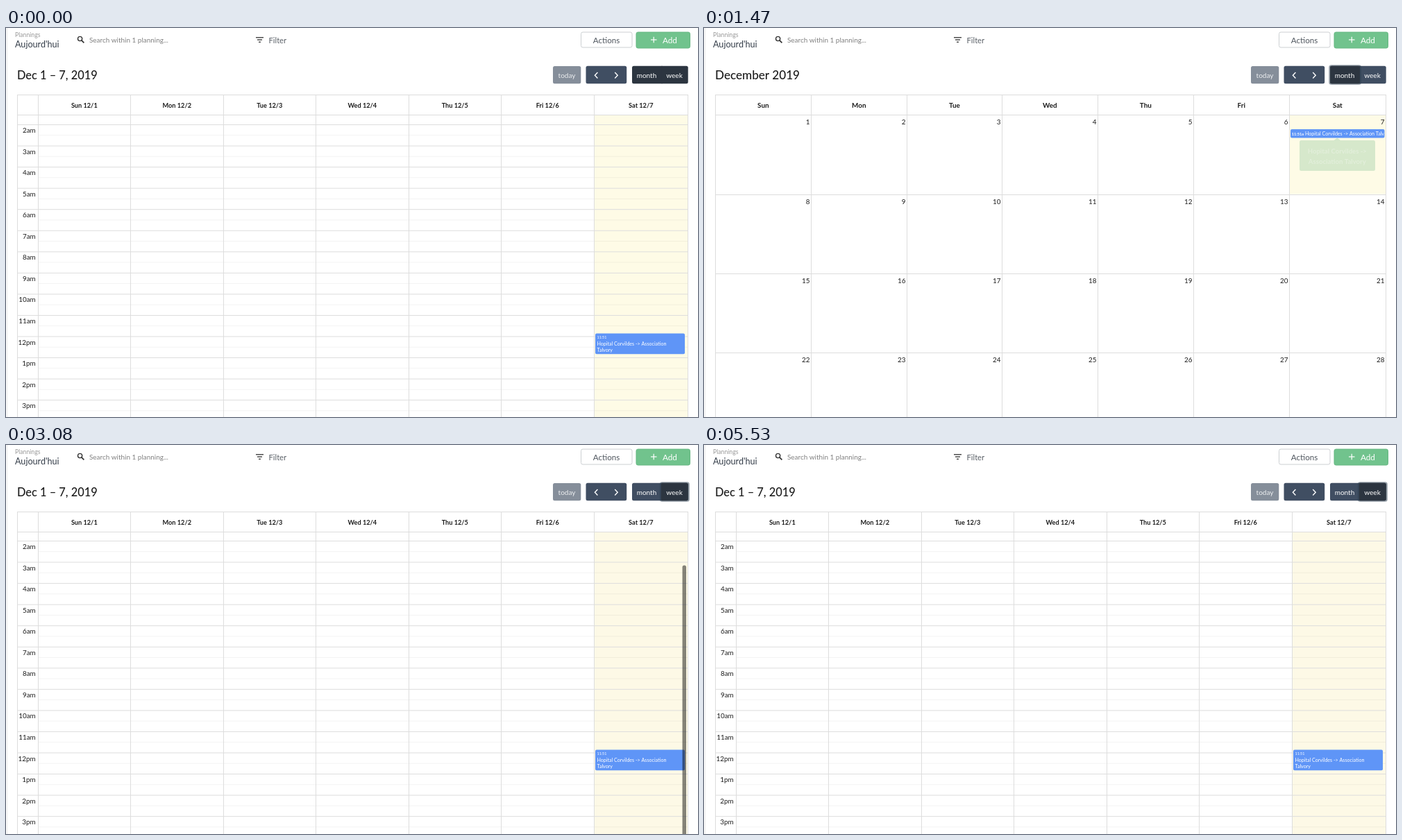
Recreate the animation shown at these times as an HTML page with a canvas. Size 997 by 561 pixels, loop 5810 ms.

```html
<!DOCTYPE html>
<html lang="en">
<head>
<meta charset="utf-8">
<title>Planning calendar</title>
<style>
  html, body { margin: 0; width: 100%; height: 100%; overflow: hidden; background: #fff; }
  canvas { display: block; width: 997px; height: 561px; }
</style>
</head>
<body>
<canvas id="stage" width="997" height="561"></canvas>
<script>
const ctx = document.getElementById('stage').getContext('2d');
const W = 997, H = 561, LOOP = 5810, STEP = 70;
const DAYS = ['Sun', 'Mon', 'Tue', 'Wed', 'Thu', 'Fri', 'Sat'];
const WEEK_X = [46, 179, 313, 446, 580, 713, 847, 982];
const MONTH_X = [16, 154, 292, 429, 567, 705, 843, 982];
const ROWS = [125, 240, 354, 468];
const PLACE = 'Hopital Corvildes', GROUP = 'Association', GROUP_NAME = 'Talvory';
const LINE = '#dddddd', INK = '#1c1c1c', BLUE = '#5f95f7', CREAM = '#fefbe6';
const SLATE = [64, 78, 98], DARK = [44, 53, 64];

const clamp = v => Math.min(1, Math.max(0, v));
const ramp = (t, from, to) => clamp((t - from) / (to - from));
const mix = (a, b, k) => `rgb(${a.map((v, i) => Math.round(v + (b[i] - v) * k))})`;

function rect(x, y, w, h, color) {
  ctx.fillStyle = color;
  ctx.fillRect(x, y, w, h);
}

function box(x, y, w, h, r, fill, stroke) {
  ctx.beginPath();
  ctx.roundRect(x, y, w, h, r);
  if (fill) { ctx.fillStyle = fill; ctx.fill(); }
  if (stroke) { ctx.strokeStyle = stroke; ctx.lineWidth = 1; ctx.stroke(); }
}

function text(str, x, y, size, color = INK, align = 'left', weight = 400) {
  ctx.font = `${weight} ${size}px Lato, "Open Sans", sans-serif`;
  ctx.textAlign = align;
  ctx.fillStyle = color;
  ctx.fillText(str, x, y);
}

function path(points, color, width) {
  ctx.beginPath();
  points.forEach(([x, y]) => ctx.lineTo(x, y));
  ctx.strokeStyle = color;
  ctx.lineWidth = width;
  ctx.stroke();
}

function drawTopBar() {
  rect(1, 0, 1, H, '#ececec');
  text('Plannings', 13, 13, 8.7, '#999');
  text("Aujourd'hui", 13, 27.5, 12.6, '#333c48');

  ctx.beginPath();
  ctx.arc(106.6, 15.5, 3.1, 0, Math.PI * 2);
  ctx.strokeStyle = '#333';
  ctx.lineWidth = 1.4;
  ctx.stroke();
  path([[108.9, 17.8], [112.4, 21.3]], '#333', 1.7);
  text('Search within 1 planning...', 120, 21, 9.95, '#808080');

  rect(360, 13, 11, 1.4, '#444');
  rect(362, 16.3, 7, 1.4, '#444');
  rect(364, 19.6, 3, 1.4, '#444');
  text('Filter', 378.5, 21.6, 11.2, '#5a6067');

  box(828.5, 6, 73.5, 22, 2.5, '#fff', '#cccfd2');
  text('Actions', 865, 22, 11.6, '#50575f', 'center');
  box(908, 6, 77.5, 23, 2.5, '#71c38d', '#66b782');
  path([[929, 17], [937.5, 17]], '#fff', 1.2);
  path([[933.2, 12.8], [933.2, 21.2]], '#fff', 1.2);
  text('Add', 946, 22, 11.7, '#fff');
}

function drawToolbar(month, week, monthRing, weekRing) {
  box(788, 55, 40.3, 25.2, 2.5, '#858e9a');
  text('today', 808, 72, 10, '#eceef0', 'center');
  box(835.5, 54.7, 58.7, 25.6, 2.5, mix(SLATE, DARK, 0));
  path([[852.4, 64], [848.4, 68.2], [852.4, 72.4]], '#fff', 1.4);
  path([[877.2, 64], [881.2, 68.2], [877.2, 72.4]], '#fff', 1.4);

  const ring = (x, w, k) => box(x, 53.2, w, 28.6, 3.5, `rgba(44,62,80,${0.5 * k})`);
  box(902, 54.7, 43.5, 25.6, [2.5, 0, 0, 2.5], mix(SLATE, DARK, month));
  box(944.5, 54.7, 38.2, 25.6, [0, 2.5, 2.5, 0], mix(SLATE, DARK, week));
  if (monthRing) {
    ring(900.3, 46.7, monthRing);
    box(902, 54.7, 43, 25.6, 2, mix(SLATE, DARK, month));
  }
  if (weekRing) {
    ring(941.8, 43, weekRing);
    box(943.8, 54.7, 38.9, 25.6, 2, mix(SLATE, DARK, week));
  }
  text('month', 923, 72, 10, '#fff', 'center');
  text('week', 963, 72, 10, '#fff', 'center');
}

function drawHeader(xs, label, size) {
  for (let i = 0; i < 7; i++) {
    text(label(i), (xs[i] + xs[i + 1]) / 2 + 0.3, 115.4, size, INK, 'center', 700);
  }
  rect(16, 96, 967, 1, LINE);
  rect(16, 125, 967, 1, LINE);
  rect(16, 96, 1, H, LINE);
  xs.forEach(x => rect(x, 96, 1, H, LINE));
}

function drawWeek(shift, bar) {
  text('Dec 1 – 7, 2019', 16, 74, 16.4, INK, 'left', 500);
  rect(848, 126, 134, H, shift ? '#fdf9e6' : CREAM);
  for (let i = 0; i < 14; i++) {
    const y = 139 + i * 30.55 + shift;
    const hour = i + 2;
    rect(16, y, 966, 1, LINE);
    rect(46, y + 15.2, 936, 1, 'rgba(0,0,0,.05)');
    text((hour > 12 ? hour - 12 : hour) + (hour < 12 ? 'am' : 'pm'),
      42.7, y + 12, 9.9, INK, 'right');
  }
  drawHeader(WEEK_X, i => `${DAYS[i]} 12/${i + 1}`, 9.2);

  const y = 441 + shift;
  box(849, y - 0.5, 129, 29.8, 2, BLUE);
  text('11:51', 851.5, y + 7, 5.4, '#fff');
  text(`${PLACE} -> ${GROUP}`, 851.5, y + 16.6, 7.1, '#fff');
  text(GROUP_NAME, 851.5, y + 26.2, 7.1, '#fff');

  if (bar) box(974.5, 173.5, 5.5, H, 2.8, `rgba(0,0,0,${0.48 * bar})`);
}

function drawMonth(tip) {
  text('December 2019', 16, 74, 17.1, INK, 'left', 500);
  rect(844, 126, 138, 113.5, CREAM);
  drawHeader(MONTH_X, i => DAYS[i], 9.9);
  ROWS.forEach((y, r) => {
    rect(16, y, 967, 1, LINE);
    for (let i = 0; i < 7; i++) {
      text(r * 7 + i + 1, MONTH_X[i + 1] - 1.5, y + 13.8, 9.9, INK, 'right');
    }
  });

  box(845, 146, 135.5, 12.5, 2, BLUE);
  ctx.save();
  ctx.beginPath();
  ctx.rect(845, 146, 134.5, 13);
  ctx.clip();
  text('11:51a', 846.8, 154.5, 5.6, '#fff', 'left', 700);
  text(`${PLACE} -> ${GROUP} ${GROUP_NAME}`, 866, 154.5, 7.1, '#fff');
  ctx.restore();

  if (tip) drawTip(tip);
}

function drawTip(alpha) {
  ctx.save();
  ctx.globalAlpha = alpha;
  ctx.beginPath();
  ctx.roundRect(858, 162, 109, 44, 2.5);
  ctx.moveTo(907.5, 162);
  ctx.lineTo(912.3, 158.5);
  ctx.lineTo(917, 162);
  ctx.fillStyle = '#74bb87';
  ctx.fill();
  text(`${PLACE} ->`, 912.3, 181, 9.6, '#fff', 'center', 700);
  text(`${GROUP} ${GROUP_NAME}`, 912.3, 195.5, 9.6, '#fff', 'center', 700);
  ctx.restore();
}

function draw(t) {
  rect(0, 0, W, H, '#fff');
  drawTopBar();

  const inMonth = t >= 210 && t < 3080;
  const monthDark = t < 3080 ? 1 : 0;
  const weekDark = t < 210 ? 1 : ramp(t, 2380, 2590);
  const weekRing = ramp(t, 2870, 3010);
  const monthRing = ramp(t, 0, 140) * (1 - weekRing);
  drawToolbar(monthDark, weekDark, monthRing, weekRing);

  if (inMonth) {
    drawMonth(t < 2310 ? 0.88 * ramp(t, 1400, 1610) : 0);
  } else {
    const bar = t >= 3080 ? 1 - ramp(t, 3500, 3780) : 0;
    drawWeek(t < 210 ? 0 : -1, bar);
  }
}

const start = performance.now();
function tick() {
  const t = (performance.now() - start) % LOOP;
  draw(Math.floor(t / STEP) * STEP);
  requestAnimationFrame(tick);
}
tick();
</script>
</body>
</html>
```
